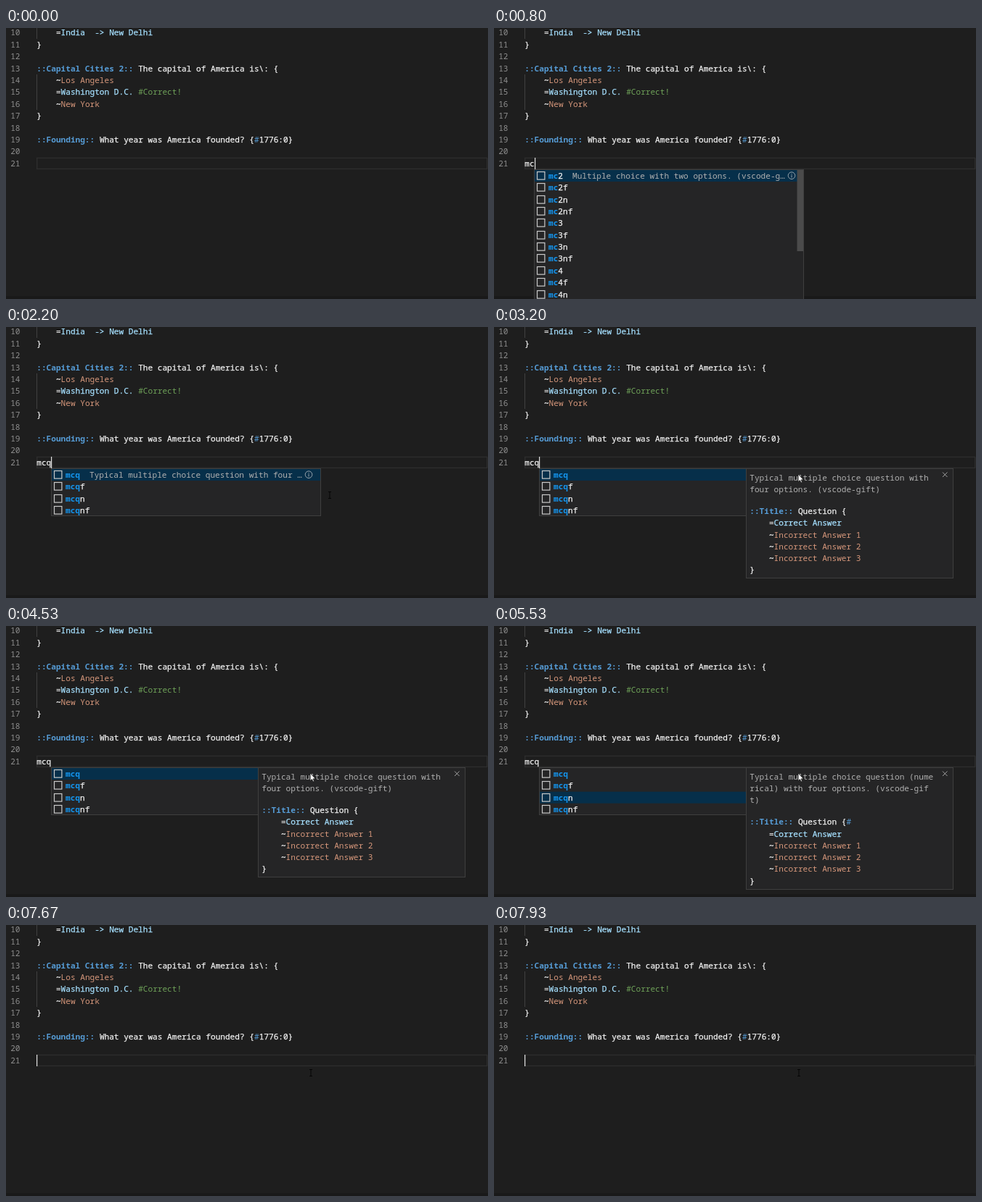
Write an HTML page with a canvas that moves like this. It is 664 by 374 pixels and loops after 8000 ms.

```html
<!DOCTYPE html>
<html>
<head>
<meta charset="utf-8">
<style>
html, body { margin: 0; width: 100%; height: 100%; overflow: hidden; background: #1e1e1e; }
canvas { display: block; }
</style>
</head>
<body>
<canvas id="stage" width="664" height="374"></canvas>
<script>
const ctx = document.getElementById('stage').getContext('2d');
const LOOP = 8000, CHAR = 6.66, LEFT = 42.3, LINE = 16.4;
const FONT = '11.1px "Noto Sans Mono", "DejaVu Sans Mono", monospace';
const C = {
  bg: '#1e1e1e', fg: '#f2f2f2', num: '#8e8e8e', title: '#569cd6', right: '#a6e0ff',
  wrong: '#d6977b', note: '#6ea158', match: '#1496f0', dim: '#b0b0b0',
  box: '#252526', edge: '#3f3f3f', pick: '#062f4a'
};
// Colours drawn with a slightly heavier stroke
const HEAVY = ['fg', 'right'];

// Times of the user's actions, in ms
const AT = { focus: 200, m: 330, c: 600, q: 835, mouse: 1920, open: 3070,
             pickF: 4590, pickN: 5460, pickNF: 6260, clear: 7670 };

// Each code line is a list of [text, colour, bold]
const answer = s => [['    =', 'fg'], [s, 'right']];
const decoy = s => [['    ~', 'fg', 1], [s, 'wrong']];
const head = (title, rest) => [['::' + title + '::', 'title', 1], [' ' + rest, 'fg']];
const close = [['}', 'fg']];
const code = [
  answer('India  -> New Delhi'), close, [],
  head('Capital Cities 2', 'The capital of America is\\: {'),
  decoy('Los Angeles'),
  [...answer('Washington D.C. '), ['#Correct!', 'note']],
  decoy('New York'), close, [],
  [...head('Founding', 'What year was America founded? {'), ['#', 'title'], ['1776:0}', 'fg']],
  [], []
];

const suffixes = ['', 'f', 'n', 'nf'];
const numbered = ['2', '3', '4'].flatMap(n => suffixes.map(s => 'mc' + n + s));
const typical = suffixes.map(s => 'mcq' + s);
const lead = 'Typical multiple choice question ';
const numeric = [lead + '(nume', 'rical) with four options. (vscode-gif', 't)'];
const docs = [
  [lead + 'with', 'four options. (vscode-gift)'],
  [lead + '(feed', 'back) with four options. (vscode-gift', ')'],
  numeric, numeric
];

function text(s, x, y, color, bold) {
  ctx.font = (bold ? 'bold ' : '') + FONT;
  ctx.fillStyle = C[color];
  ctx.fillText(s, x, y);
  if (HEAVY.includes(color)) {
    ctx.strokeStyle = C[color];
    ctx.lineWidth = .25;
    ctx.strokeText(s, x, y);
  }
}

function spans(list, x, y) {
  for (const [s, color, bold] of list) {
    text(s, x, y, color, bold);
    x += s.length * CHAR;
  }
}

function rect(x, y, w, h, color) {
  ctx.fillStyle = color;
  ctx.fillRect(x, y, w, h);
}

function frame(x, y, w, h, fill, edge) {
  rect(x, y, w, h, fill);
  ctx.strokeStyle = edge;
  ctx.lineWidth = 1;
  ctx.strokeRect(x + .5, y + .5, w - 1, h - 1);
}

function path(points, closed) {
  ctx.beginPath();
  points.forEach(([x, y]) => ctx.lineTo(x, y));
  if (closed) ctx.closePath();
}

function editor() {
  rect(0, 0, 664, 374, C.bg);
  rect(0, 370, 664, 4, '#191919');
  rect(42, 0, 1, 15, '#404040');
  rect(42, 64, 1, 49, '#404040');
  ctx.strokeStyle = '#2d2d2d';
  ctx.lineWidth = 1.4;
  ctx.strokeRect(42.7, 179.4, 620, 15);
  code.forEach((line, i) => {
    const y = 10.3 + i * LINE;
    text(String(10 + i), 6.2, y, 'num');
    spans(line, LEFT, y);
  });
}

function snippetIcon(x, y) {
  ctx.strokeStyle = '#c9c9c9';
  ctx.lineWidth = 1.2;
  ctx.strokeRect(x + .5, y + .5, 10.4, 10.6);
}

function infoIcon(x, y) {
  ctx.strokeStyle = '#9aa5ad';
  ctx.lineWidth = 1;
  ctx.beginPath();
  ctx.arc(x, y, 4.8, 0, 7);
  ctx.stroke();
  rect(x - .5, y - 2.6, 1, 1.2, '#9aa5ad');
  rect(x - .5, y - .6, 1, 3.4, '#9aa5ad');
}

function list(items, typed, picked, opened) {
  const px = Math.round(LEFT + typed.length * CHAR - .4);
  const width = opened ? 347 - px + 1 : 372;
  const height = Math.min(items.length, 12) * 16.3 + 1;
  frame(px, 195, width, Math.round(height), C.box, C.edge);
  rect(px + 1, 196 + picked * 16.35, width - 2, 16, C.pick);
  items.forEach((item, i) => {
    const y = 208 + i * 16.35, x = px + 20;
    snippetIcon(px + 4, Math.round(y - 10));
    text(typed, x, y, 'match', 1);
    text(item.slice(typed.length), x + typed.length * CHAR, y, 'fg');
  });
  if (!opened) {
    const hint = typed === 'mcq' ? lead + 'with four …'
      : 'Multiple choice with two options. (vscode-g…';
    text(hint, px + 53, 208, 'dim');
    infoIcon(px + 355, 203.7);
  }
  if (items.length > 4) rect(px + 362.5, 196, 8.5, 112, '#4b4b4b');
}

function details(picked) {
  const doc = docs[picked], tall = doc.length - 2;
  const note = picked % 2 ? [[' #Feedback', 'note']] : [];
  const opener = head('Title', 'Question {');
  if (picked > 1) opener.push(['#', 'title']);
  const body = [
    opener,
    [...answer('Correct Answer'), ...note],
    ...[1, 2, 3].map(n => [...decoy('Incorrect Answer ' + n), ...note]),
    close
  ];
  frame(347, 195, 286, 152 + tall * 17, C.box, C.edge);
  doc.forEach((s, i) => text(s, 352.3, 211.8 + i * 16.2, 'dim'));
  body.forEach((line, i) => spans(line, 352.3, 258 + (tall + i) * 16.25));
  ctx.strokeStyle = '#a0a0a0';
  ctx.lineWidth = 1;
  path([[618, 200.5], [624.5, 207]]);
  ctx.stroke();
  path([[624.5, 200.5], [618, 207]]);
  ctx.stroke();
}

function mousePos(t) {
  const mix = (a, b, k) => a + (b - a) * k;
  if (t < 2200) {
    const k = 1 - (1 - (t - AT.mouse) / (2200 - AT.mouse)) ** 2;
    return [mix(660, 446, k), mix(268, 232, k)];
  }
  const u = Math.min(1, Math.max(0, (t - 2230) / 470)), k = u * u * (3 - 2 * u);
  return [mix(446, 420, k), mix(232, 204, k)];
}

function pointer(t, popup) {
  if (t < AT.mouse) return;
  const [x, y] = mousePos(t);
  if (popup && x < 434 && y < 261) {
    const tip = [[0, 0], [0, 10.5], [2.4, 8.3], [4, 11.8], [5.6, 11.1], [4.1, 7.7], [7.3, 7.5]];
    path(tip.map(([a, b]) => [x - 1 + a, y - .8 + b]), true);
    ctx.fillStyle = '#fff';
    ctx.fill();
    ctx.strokeStyle = '#111';
    ctx.lineWidth = .8;
    ctx.stroke();
  } else {
    rect(x - .5, y - 4.5, 1, 9, '#050505');
    rect(x - 2, y - 5, 4, 1, '#050505');
    rect(x - 2, y + 4, 4, 1, '#050505');
  }
}

function caretOn(t) {
  if (t < AT.focus) return false;
  if (t < AT.q || t >= AT.clear) return true;
  return (t - AT.q) % 1000 < 500;
}

function draw(t) {
  let typed = '';
  if (t < AT.clear) typed = t >= AT.q ? 'mcq' : t >= AT.c ? 'mc' : t >= AT.m ? 'm' : '';
  const opened = t >= AT.open;
  const picked = [AT.pickF, AT.pickN, AT.pickNF].filter(a => t >= a).length;
  editor();
  text(typed, LEFT, 190.7, 'fg');
  if (caretOn(t)) rect(Math.round(LEFT + typed.length * CHAR), 179, 1.2, 16, '#e0e0e0');
  if (typed) {
    list(typed === 'mcq' ? typical : numbered, typed, picked, opened);
    if (opened) details(picked);
  }
  pointer(t, typed !== '');
}

const start = performance.now();
function tick() {
  draw((performance.now() - start) % LOOP);
  requestAnimationFrame(tick);
}
tick();
</script>
</body>
</html>
```
